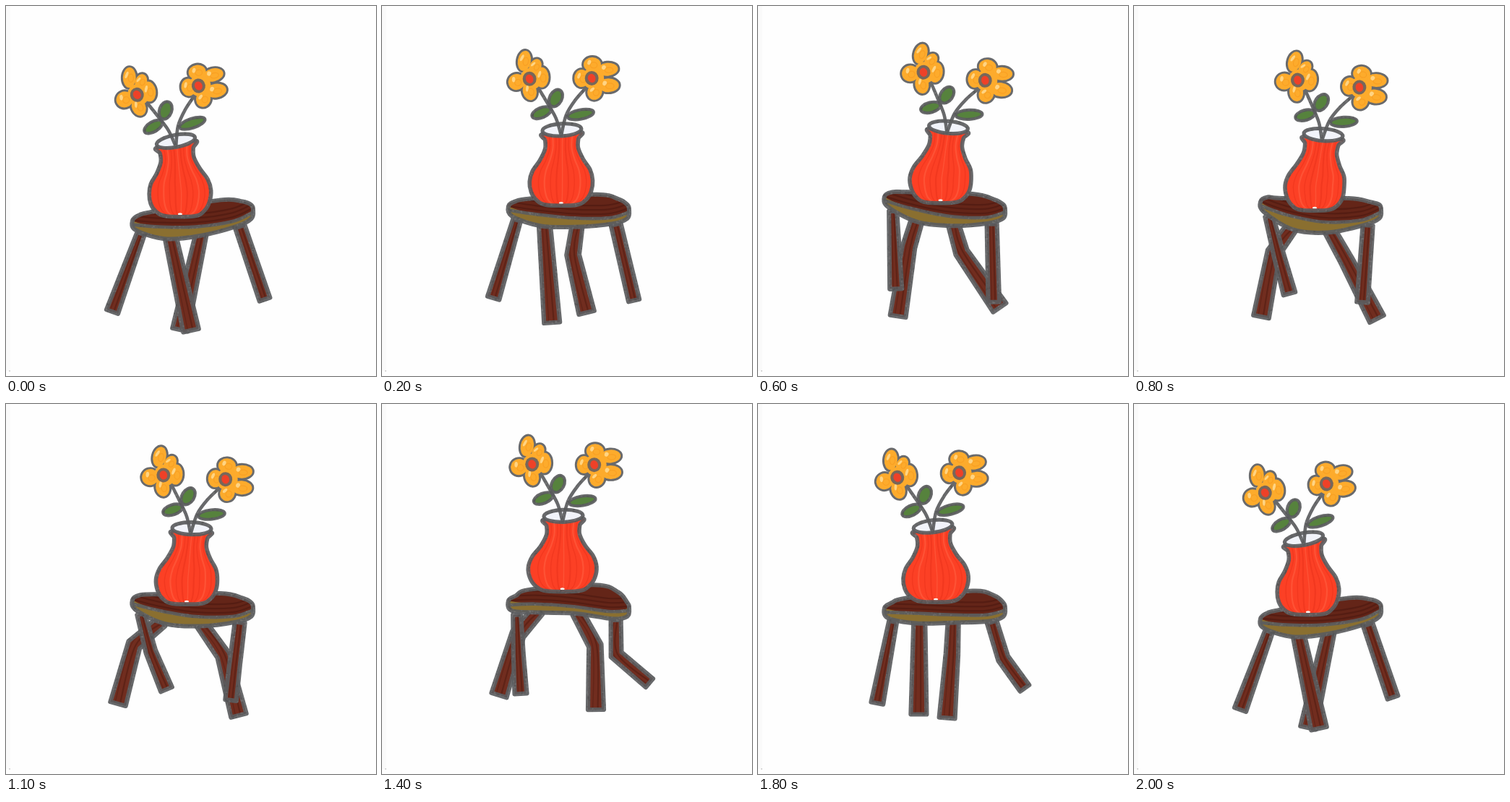
Recreate the animation shown at these times as an HTML page with a canvas. Size 512 by 512 pixels, loop 2100 ms.

```html
<!DOCTYPE html>
<html lang="en">
<head>
<meta charset="utf-8">
<title>Walking stool</title>
<style>
html, body { margin: 0; width: 100%; height: 100%; overflow: hidden; background: #fefefe; }
canvas { display: block; width: 100vw; height: 100vh; }
</style>
</head>
<body>
<canvas id="stage" width="512" height="512"></canvas>
<script>
const ctx = document.getElementById('stage').getContext('2d');
const LOOP = 2100, STEP = 100;
// the last key repeats the first pose
const TIMES = [0, 400, 800, 1100, 1400, 1600, 2000];

// the whole body follows three tracks
const LEFT_Y = [298, 262, 272, 272, 273, 270];
const SAG = [30, 25, 37, 31, 13, 13];
const RIM_X = [235, 261, 262, 257, 251, 249];

// hip: place along the seat, share of the sag, drop; knee: place along the leg
const LEGS = [
  { x: [241, 321, 336, 322, 296, 283], y: [448, 407, 433, 431, 423, 422],
    hip: [.57, .9, 0], knee: .34, wide: [15, 22],
    bend: t => 17 * bump(t, 1300, 600) - 21 * bump(t, 400, 400) },
  { x: [256, 213, 176, 155, 162, 187], y: [449, 429, 430, 415, 403, 410],
    hip: [.29, .9, -1], knee: .28, wide: [16, 22], swing: .12,
    bend: t => -21 * bump(t, 1100, 700) },
  { x: [147, 166, 215, 222, 192, 183], y: [423, 389, 398, 395, 401, 405],
    hip: [.07, 0, 18], knee: .5, wide: [11, 17], bend: t => -4 * bump(t, 1100, 400) },
  { x: [358, 338, 316, 311, 370, 378], y: [406, 409, 410, 410, 386, 382],
    hip: [.89, .2, 17], knee: .55, wide: [14, 15.5], bend: t => -30 * bump(t, 1520, 450) }
];

function bump(t, mid, half) {
  const d = Math.min(1, Math.abs(t - mid) / half);
  return Math.cos(d * Math.PI / 2) ** 2;
}

// periodic cubic through the keys
function at(values, t) {
  const n = TIMES.length;
  const time = i => TIMES[(i + n) % n] + LOOP * Math.floor(i / n);
  const key = i => values[(i + n) % n % values.length];
  let i = n - 1;
  while (TIMES[i] > t) i--;
  const h = time(i + 1) - time(i), u = (t - time(i)) / h, a = key(i), b = key(i + 1);
  const slope = k => h * (key(k + 1) - key(k - 1)) / (time(k + 1) - time(k - 1));
  const m = slope(i), q = slope(i + 1);
  return a + u * (m + u * (3 * (b - a) - 2 * m - q + u * (2 * (a - b) + m + q)));
}

let seed = 7;
const rnd = () => (seed = seed * 16807 % 2147483647) / 2147483647;

function inkPattern() {
  const c = document.createElement('canvas');
  c.width = c.height = 128;
  const g = c.getContext('2d');
  g.fillStyle = 'rgba(92,93,95,.92)';
  g.fillRect(0, 0, 128, 128);
  for (let i = 0; i < 900; i++) {
    g.fillStyle = rnd() < .5 ? 'rgba(135,135,135,.3)' : 'rgba(65,65,65,.25)';
    g.fillRect(rnd() * 128, rnd() * 128, 1 + rnd() * 2, 1 + rnd() * 2);
  }
  return ctx.createPattern(c, 'repeat');
}
const ink = inkPattern();

function smooth(pts, closed) {
  const path = new Path2D(), n = pts.length;
  const p = i => closed ? pts[(i + n) % n] : pts[Math.max(0, Math.min(n - 1, i))];
  path.moveTo(...pts[0]);
  for (let i = 0; i < (closed ? n : n - 1); i++) {
    const [a, b, c, d] = [p(i - 1), p(i), p(i + 1), p(i + 2)];
    path.bezierCurveTo(b[0] + (c[0] - a[0]) / 6, b[1] + (c[1] - a[1]) / 6,
      c[0] - (d[0] - b[0]) / 6, c[1] - (d[1] - b[1]) / 6, c[0], c[1]);
  }
  if (closed) path.closePath();
  return path;
}

function poly(pts) {
  const path = new Path2D();
  pts.forEach(p => path.lineTo(...p));
  path.closePath();
  return path;
}

function oval(x, y, rx, ry, deg = 0) {
  const path = new Path2D();
  path.ellipse(x, y, rx, ry, deg * Math.PI / 180, 0, 7);
  return path;
}

function line(path, width, style = ink) {
  ctx.lineWidth = width;
  ctx.strokeStyle = style;
  ctx.stroke(path);
}

function fill(path, style) {
  ctx.fillStyle = style;
  ctx.fill(path);
}

function inside(path, draw) {
  ctx.save();
  ctx.clip(path);
  draw();
  ctx.restore();
}

function pose(t) {
  const left = at(LEFT_Y, t), sag = at(SAG, t), rimX = at(RIM_X, t);
  const on = (u, dy) => [175 + 167 * u, left + (280 - left) * u + dy];
  const baseY = on(.4, sag - 30)[1];
  return {
    sag, on, baseY, rimX,
    rimY: baseY - 104,
    bellyX: 250 - (left - 272) * .35,
    girth: 1.18 - .0062 * sag,
    tilt: (rimX - 250) * .55
  };
}

function leg(l, t, { on, sag }) {
  const foot = [at(l.x, t), at(l.y, t)];
  const [u, share, drop] = l.hip;
  const hip = on(u, share * sag + drop);
  hip[0] += (l.swing || 0) * (foot[0] - hip[0]);
  const knee = [0, 1].map(i => hip[i] + (foot[i] - hip[i]) * l.knee);
  knee[0] += l.bend(t);

  const normal = (a, b) => {
    const dx = b[0] - a[0], dy = b[1] - a[1], d = Math.hypot(dx, dy);
    return [-dy / d, dx / d];
  };
  const n0 = normal(hip, knee), n2 = normal(knee, foot);
  const sx = n0[0] + n2[0], sy = n0[1] + n2[1], s = 2 / (sx * sx + sy * sy);
  const normals = [n0, [sx * s, sy * s], n2];
  const [w0, w2] = l.wide, widths = [w0, w0 + (w2 - w0) * l.knee, w2];
  const side = k => [hip, knee, foot].map((p, i) =>
    p.map((v, j) => v + normals[i][j] * widths[i] * k));

  const shape = poly([...side(.5), ...side(-.5).reverse()]);
  fill(shape, '#712d1f');
  inside(shape, () => {
    line(smooth(side(-.12)), 2.2, 'rgba(66,20,12,.4)');
    line(smooth(side(.2)), 1.5, 'rgba(66,20,12,.3)');
  });
  line(shape, 6.2);
}

function seat({ on, sag }) {
  const rise = 33 - .6 * sag;
  const back = [on(0, -1), on(.06, -8), on(.18, -.7 * rise), on(.73, -1.1 * rise),
    on(.91, -.75 * rise), on(.985, -5), on(1, 2)];
  const base = [on(.985, 14), on(.86, 15 + .25 * sag), on(.56, sag), on(.27, .9 * sag + 2), on(.03, 13)];
  const edge = [on(.015, 5), on(.22, .55 * sag - 5), on(.52, .8 * sag - 7), on(.83, .4 * sag + 3), on(.99, 6)];
  const body = smooth([...back, ...base], true);
  const top = smooth([...back, ...edge.slice(1, 4).reverse()], true);
  fill(body, '#8a6f30');
  fill(top, '#642518');
  inside(top, () => {
    for (const d of [-6, -12, -18])
      line(smooth(edge.map(p => [p[0], p[1] + d])), 2.2, 'rgba(58,15,9,.35)');
  });
  line(smooth(edge), 4.6);
  line(body, 6);
}

// height along the vase, half width
const PROFILE = [[.04, 26], [.13, 23], [.25, 23], [.4, 30], [.54, 39.5], [.68, 43], [.82, 41], [.93, 34], [1, 20]];

function pot({ rimX, rimY, bellyX, baseY, girth, tilt }) {
  const spot = (v, w) => {
    const k = 1 + (girth - 1) * Math.max(0, Math.min(1, (v - .3) * 3));
    const lean = Math.sin((tilt - 2.5) * Math.PI / 180) * w * k * (1 - v);
    return [rimX + (bellyX - rimX) * Math.min(1, v / .68) + w * k, rimY + (baseY - rimY) * v + lean];
  };
  const strip = f => PROFILE.map(([v, w]) => spot(v, w * f));
  const shape = smooth([...strip(-1), ...strip(1).reverse()], true);
  fill(shape, '#fc4025');
  inside(shape, () => {
    for (let i = -4; i <= 4; i++)
      line(smooth(strip(i * .19 + .04)), i % 2 ? 2.2 : 1.4, i % 3 ? 'rgba(222,40,22,.35)' : 'rgba(255,105,75,.45)');
    fill(oval(bellyX, baseY - 3, 3, 1.5), '#fff3ee');
  });
  line(shape, 5.6);
}

// petals: x, y, rx, ry, angle
const LEFT = [[-7,-25,9,14,10], [8,-17,8,11,30], [17,-2,9.5,14,0], [0,17,9.5,12.5,-15], [-18,4,11.5,11,-20]];
const RIGHT = [[1,-19,12,10,0], [-14,0,10,12,0], [22,-12,14.5,9,-5], [23,10,14.5,9.5,0], [4,19,10,11,25]];

function flower(x, y, petals) {
  ctx.save();
  ctx.translate(x, y);
  petals.forEach(p => line(oval(...p), 5.8, '#696a6c'));
  petals.forEach(p => fill(oval(...p), '#fdab2c'));
  fill(oval(2, 0, 15, 15), '#fdab2c');
  petals.forEach(([px, py, a, b, r]) => {
    fill(oval(px - a * .35, py - b * .3, a * .2, b * .35, r + 20), 'rgba(255,226,160,.75)');
    line(oval(px + 2, py + 1, a * .4, b * .4, r), 1.2, 'rgba(240,140,20,.35)');
  });
  fill(oval(0, 0, 9.5, 10), '#77675a');
  fill(oval(0, 0, 5.3, 6.2, -20), '#ee4128');
  ctx.restore();
}

function leaf(...at) {
  const shape = oval(...at);
  fill(shape, '#56823d');
  line(shape, 4.2);
}

function bouquet({ rimX, rimY, tilt }) {
  ctx.save();
  ctx.translate(rimX, rimY);
  ctx.rotate(tilt * Math.PI / 180);
  const rim = oval(0, 0, 27, 8.5, -2.5);
  fill(rim, '#f1f3fa');
  leaf(-28, -24, 14, 7, -22);
  leaf(-8, -44, 8.5, 12.5, 28);
  leaf(26, -21, 18.5, 6.5, -10);
  line(smooth([[-33, -60], [-20, -38], [-8, -16], [-1, 8]]), 4.6);
  line(smooth([[36, -60], [19, -41], [6, -20], [-1, 8]]), 4.6);
  flower(-44, -71, LEFT);
  flower(42, -71, RIGHT);
  line(rim, 5.2);
  ctx.restore();
}

function paper() {
  ctx.fillStyle = '#fefefe';
  ctx.fillRect(0, 0, 512, 512);
  ctx.fillStyle = '#fafafa';
  ctx.fillRect(0, 0, 6, 505);
  ctx.fillStyle = '#d8d8d8';
  ctx.fillRect(4, 504, 2, 2);
}

function draw(t) {
  const p = pose(t);
  paper();
  LEGS.forEach(l => leg(l, t, p));
  seat(p);
  pot(p);
  bouquet(p);
}

ctx.lineJoin = ctx.lineCap = 'round';

function tick() {
  draw(Math.floor(performance.now() % LOOP / STEP) * STEP);
  requestAnimationFrame(tick);
}
tick();
</script>
</body>
</html>
```
